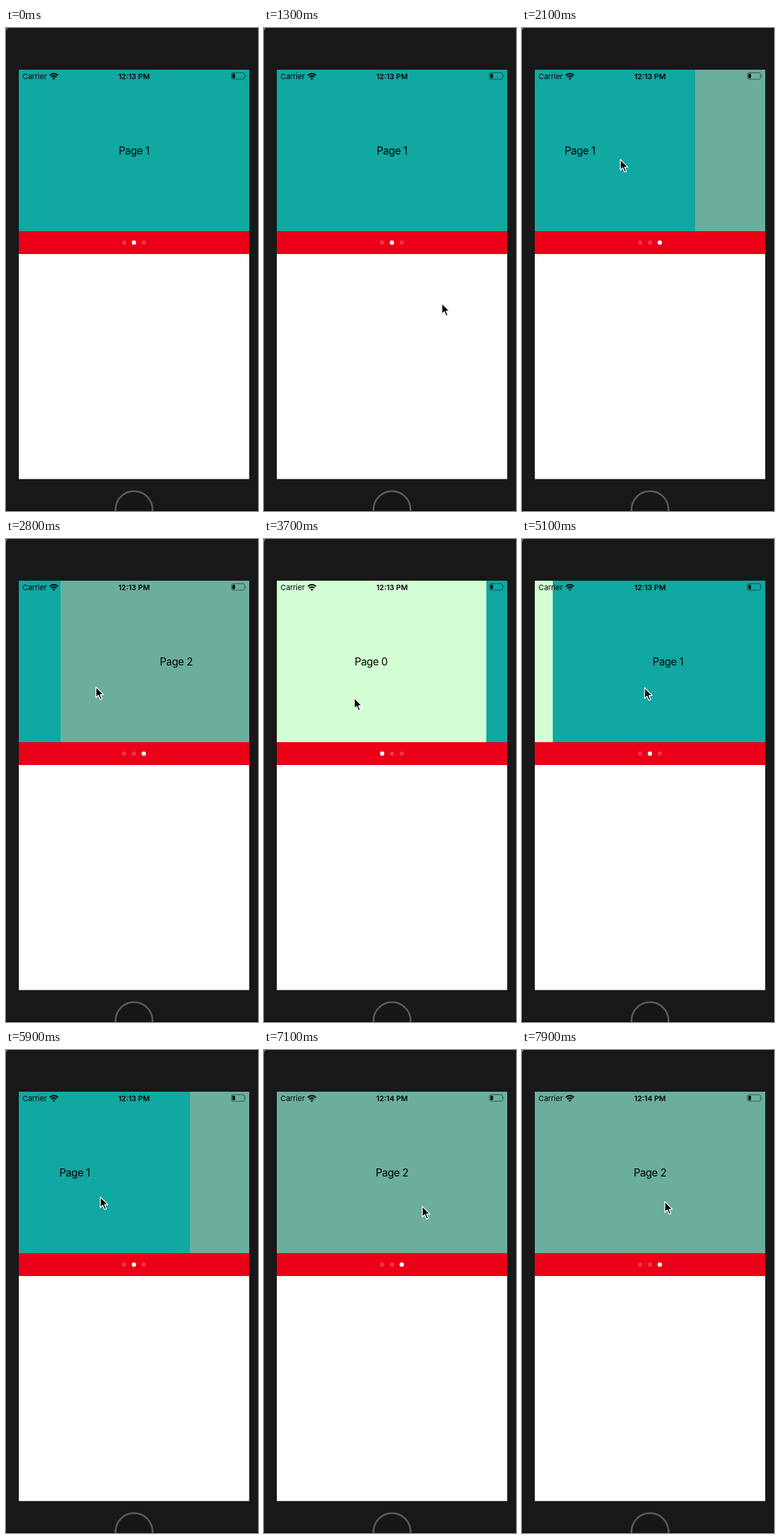
Write an HTML page that moves like this. It is 374 by 718 pixels and loops after 8 s.

```html
<!DOCTYPE html>
<html lang="en">
<head>
<meta charset="utf-8">
<title>Page control</title>
<style>
  html, body { margin: 0; width: 100%; height: 100%; overflow: hidden; background: #181818; }
  svg { display: block; }
  text { font-family: Inter, Roboto, sans-serif; fill: #000; }
  .page { font-size: 15.5px; letter-spacing: -.37px; text-anchor: middle; }
  .bar { font-size: 11px; }
  .clock { font-weight: 600; text-anchor: middle; }
  .dot { fill: #fff; fill-opacity: .2; }
  .dot.on { fill-opacity: 1; }
</style>
</head>
<body>
<svg width="374" height="718" viewBox="0 0 374 718">
  <rect width="374" height="718" fill="#181818"/>
  <path d="M0 0H3Q1 1 0 4Z" fill="#777"/>
  <rect y="716.5" width="374" height="1.5" fill="#140a12"/>
  <circle cx="190" cy="716" r="27.5" fill="#161616" stroke="#5c5c5c" stroke-width="2.6"/>

  <rect x="19" y="62" width="342" height="608.5" fill="#fff"/>
  <svg x="19" y="62" width="342" height="240" overflow="hidden">
    <g id="pages"></g>
  </svg>
  <rect x="19" y="302" width="342" height="34" fill="#ec0017"/>
  <g id="dots"></g>

  <text class="bar" x="24.6" y="75.8">Carrier</text>
  <g fill="none" stroke="#000" stroke-width="2">
    <path d="M64.9 70.6Q71 64.9 77.1 70.6"/>
    <path d="M67.3 73.1Q71 69.7 74.7 73.1"/>
  </g>
  <path d="M71 76.9L69 74.9Q71 73.3 73 74.9Z"/>
  <text class="bar clock" id="clock" x="190" y="75.8"></text>
  <rect x="334.5" y="66.5" width="19.6" height="9.6" rx="2.4" fill="none" stroke="#000" stroke-opacity=".5"/>
  <path d="M355.4 69.6Q357 71.3 355.4 73Z" fill-opacity=".5"/>
  <rect x="336" y="68" width="3.8" height="6.6" rx="1"/>

  <path id="cursor" d="M1 1.4V17.2L4.6 13.8L7.3 20.2L9.9 19.1L7.3 12.9H12.2Z"
    stroke="#fff" stroke-width="1.3" stroke-linejoin="round"/>
</svg>
<script>
const LOOP = 8000, STEP = 100, WIDTH = 342;
const byId = id => document.getElementById(id);
const pages = byId('pages'), dots = byId('dots'), clock = byId('clock'), cursor = byId('cursor');

['#d2ffd4', '#10a8a1', '#6bae9d'].forEach((color, i) => {
  pages.innerHTML += `<rect x="${i * WIDTH}" width="${WIDTH}" height="240" fill="${color}"/>
    <text class="page" x="${(i + .5) * WIDTH}" y="126">Page ${i}</text>`;
  dots.innerHTML += `<circle class="dot" cx="${175.3 + i * 14.6}" cy="319" r="3.2"/>`;
});

// [time, scroll offset, settles after release]
const scroll = [
  [1900, 342], [2100, 446], [2600, 684, 1], [2700, 684], [2850, 590], [3200, 342, 1],
  [3350, 250], [3600, 0, 1], [3700, 31], [4100, 342, 1], [4200, 342], [4400, 405],
  [4600, 465], [5000, 342], [5300, 262], [5600, 342, 1], [5700, 342], [5900, 430],
  [6200, 480], [6700, 684, 1]
];

// [time, x, y]
const pointer = [
  [400, 355, 602], [500, 309, 558], [1200, 309, 558], [1400, 217, 258], [1500, 217, 258],
  [1700, 215, 194], [1900, 215, 194], [2100, 145, 194], [2300, 95, 205], [2700, 80, 215],
  [2900, 185, 222], [3100, 120, 226], [3400, 230, 232], [3600, 165, 235], [3700, 133, 235],
  [3900, 75, 227], [4100, 154, 221], [4200, 154, 221], [4400, 91, 219], [4600, 32, 219],
  [5000, 154, 220], [5300, 235, 219], [5700, 227, 218], [5900, 139, 217], [6200, 90, 220],
  [6900, 236, 231], [7100, 234, 231], [7900, 211, 224]
];

// [time, active dot]
const active = [[0, 1], [2100, 2], [2900, 1], [3400, 0], [3800, 1], [6300, 2]];

function at(track, t, col, settle = false) {
  const i = track.findIndex(k => k[0] > t);
  if (i < 0) return track[track.length - 1][col];
  if (i === 0) return track[0][col];
  const a = track[i - 1], b = track[i];
  let u = (t - a[0]) / (b[0] - a[0]);
  if (settle && b[2]) u = 1 - (1 - u) ** 2;
  return a[col] + (b[col] - a[col]) * u;
}

function draw() {
  const t = Math.floor(performance.now() % LOOP / STEP) * STEP;
  pages.setAttribute('transform', `translate(${-at(scroll, t, 1, true)})`);
  cursor.setAttribute('transform', `translate(${at(pointer, t, 1)} ${at(pointer, t, 2)})`);
  cursor.setAttribute('visibility', t < pointer[0][0] ? 'hidden' : 'visible');
  const on = active.filter(k => k[0] <= t).pop()[1];
  [...dots.children].forEach((dot, i) => dot.classList.toggle('on', i === on));
  clock.textContent = t < 6500 ? '12:13 PM' : '12:14 PM';
  requestAnimationFrame(draw);
}
draw();
</script>
</body>
</html>
```
